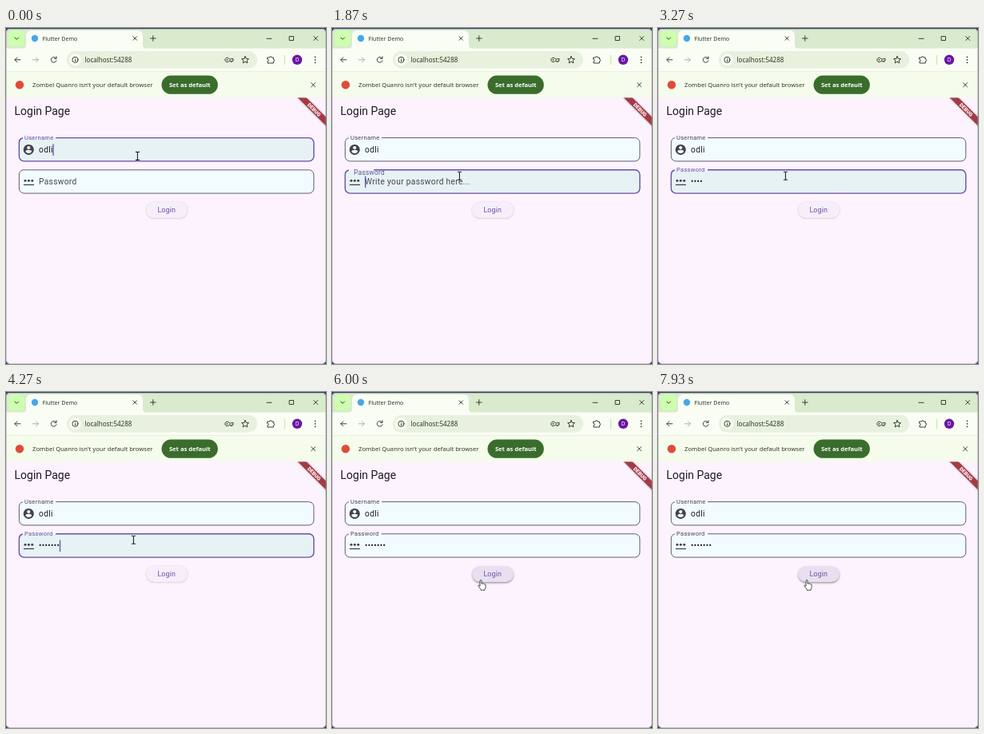
Write an HTML page that moves like this. It is 400 by 421 pixels and loops after 8 s.

```html
<!DOCTYPE html>
<html lang="en">
<head>
<meta charset="utf-8">
<title>Login Page</title>
<style>
  html, body { margin: 0; width: 100%; height: 100%; overflow: hidden; background: #34406b; }
  svg { display: block; width: 100vw; height: 100vh; }
  text { font-family: Roboto, sans-serif; fill: #1d1b20; white-space: pre; }
  .ui text { font-family: "Noto Sans", "Open Sans", sans-serif; fill: #30392a; }
  .line { fill: none; stroke: #2f382a; stroke-width: .95; stroke-linecap: round; stroke-linejoin: round; }
  .body { font-size: 10.2px; letter-spacing: .32px; }
  .muted { fill: #49454f; }
  .icon { fill: #45414b; }
  .cursor path { fill: #fff; stroke: #222; stroke-width: .8; stroke-linejoin: round; }
</style>
</head>
<body>
<svg viewBox="0 0 400 421" preserveAspectRatio="none">
  <defs>
    <filter id="soft" x="-20%" y="-40%" width="140%" height="200%"><feGaussianBlur stdDeviation="1"/></filter>
    <clipPath id="window"><rect y="1" width="400" height="420" rx="5"/></clipPath>
    <clipPath id="page"><rect y="87.500" width="400" height="334"/></clipPath>
  </defs>

  <g clip-path="url(#window)">
    <rect width="400" height="421" fill="#fdf3fe"/>
    <g class="ui">
      <rect width="400" height="27" fill="#d9eacd"/>
      <rect x="3" y="3" width="20" height="20" rx="6" fill="#cdffae"/>
      <path class="line" d="M11 12l2.300 2.300L15.600 12"/>
      <path d="M20 26q5 0 5-5V10q0-7 7-7h132q7 0 7 7v11q0 5 5 5z" fill="#f9fdf3"/>
      <circle cx="36" cy="13" r="4.200" fill="#47a6ea"/>
      <text x="45.500" y="15.800" font-size="7.100">Flutter Demo</text>
      <path class="line" d="M159 10.800l4.400 4.400m0-4.400l-4.400 4.400M180.500 13h6.600m-3.300-3.300v6.600M326 13.300h6M354.500 10.500h5v5h-5zM384.700 10.500l5 5m0-5l-5 5"/>

      <rect y="25.500" width="400" height="29" fill="#f9fdf3"/>
      <path class="line" d="M18 39.800h-7m3-3l-3 3 3 3"/>
      <path class="line" d="M33.500 39.800h7m-3-3l3 3-3 3" style="stroke:#a7afa1"/>
      <path class="line" d="M62.600 38a3.400 3.400 0 1 0 .4 2.800M63 35.800v2.500h-2.500"/>
      <rect x="76" y="29" width="238" height="21.500" rx="10.750" fill="#e7f1de"/>
      <circle cx="86.500" cy="39.800" r="7.500" fill="#f9fdf3"/>
      <circle class="line" cx="86.500" cy="39.800" r="3.600"/>
      <path class="line" d="M86.500 39.700v2M86.500 37.900v.1"/>
      <text x="98.500" y="42.700" font-size="8">localhost:54288</text>
      <path class="line" d="M279.200 38.800a2.800 2.800 0 1 0 0 2.200h1.600v1.300h1.900v-1.300h1.300v-2.200z"/>
      <circle cx="276.500" cy="39.900" r=".9" fill="#2f382a"/>
      <path class="line" d="M299 35.500l1.300 2.900 3.100.3-2.300 2.100.7 3.100-2.800-1.600-2.800 1.600.7-3.100-2.300-2.100 3.100-.3z"/>
      <path class="line" d="M327 37h2.500a1.300 1.300 0 0 1 2.600 0h2.200v2.200a1.300 1.300 0 0 1 0 2.600V44H327v-2.200a1.300 1.300 0 0 0 0-2.600z"/>
      <path d="M348.500 34v12" stroke="#c3edaa" stroke-width="1.200"/>
      <circle cx="364" cy="39.800" r="6.200" fill="#6b18a5"/>
      <text x="364" y="42.100" font-size="6.300" text-anchor="middle" style="fill:#fff">D</text>
      <g fill="#2f382a"><circle cx="386.500" cy="36.300" r=".9"/><circle cx="386.500" cy="39.800" r=".9"/><circle cx="386.500" cy="43.300" r=".9"/></g>

      <rect y="54.500" width="400" height="33" fill="#f5fcec"/>
      <path d="M0 54.500h400" stroke="#e5eedc" stroke-width=".7"/>
      <circle cx="17" cy="71.300" r="5.200" fill="#e14a3b"/>
      <text x="33" y="74.200" font-size="7.660">Zombel Quanro isn't your default browser</text>
      <rect x="194.500" y="59.500" width="70.300" height="23.300" rx="11.650" fill="#3a6d2c"/>
      <text x="229.800" y="74" font-size="7.600" font-weight="600" text-anchor="middle" style="fill:#fff">Set as default</text>
      <path class="line" d="M381.600 68.800l5 5m0-5l-5 5"/>
    </g>

    <text x="10.500" y="109.300" font-size="14">Login Page</text>
    <g clip-path="url(#page)">
      <g transform="translate(400 87.500) rotate(45)">
        <rect x="-30" y="17.200" width="60" height="7.600" fill="#000" opacity=".4" filter="url(#soft)"/>
        <rect x="-30" y="17.200" width="60" height="7.600" fill="#a53a46"/>
        <text y="23.300" font-size="6.500" font-weight="900" text-anchor="middle" style="fill:#fff">DEBUG</text>
      </g>
    </g>

    <g id="fields"></g>
    <g class="icon">
      <path fill-rule="evenodd" d="M28.300 145.900a6.500 6.500 0 1 0 .01 0zM28.300 147.900a2.100 2.100 0 1 1-.01 0zM24.400 155q0-2.300 3.900-2.300t3.900 2.300a4.700 4.700 0 0 1-7.800 0z"/>
      <circle cx="24" cy="191.300" r="1.500"/><circle cx="28.400" cy="191.300" r="1.500"/><circle cx="32.800" cy="191.300" r="1.500"/>
      <rect x="22" y="195.800" width="13" height="1.300"/>
    </g>

    <rect id="shadow" x="175" y="219" width="52" height="20" rx="10" fill="#000" filter="url(#soft)"/>
    <rect id="button" x="175" y="218" width="52" height="20" rx="10"/>
    <text x="200.700" y="231.300" font-size="8.900" letter-spacing=".12" text-anchor="middle" style="fill:#6750a4">Login</text>
    <rect x=".4" y="1.400" width="399.200" height="419.200" rx="5" fill="none" stroke="#81858c" stroke-width=".7" opacity=".7"/>
  </g>

  <g id="mouse" class="cursor">
    <path id="beam" d="M-2.500-5h1.500q1 0 1 1 0-1 1-1h1.500M0-4V4M-2.500 5h1.500q1 0 1-1 0 1 1 1h1.500" style="fill:none;stroke-width:1.100"/>
    <path id="arrow" d="M0 0v9.300l2.100-2 1.600 3.700 1.700-.7-1.600-3.600h3z"/>
    <path id="hand" d="M-1 .7q1-1.400 2 0v4q1-.8 1.700.2 1-.7 1.700.4 1.300-.6 1.600.8v3.200q0 1.400-1 2.500v1H.2v-1L-2.900 8q-.6-1.300.5-1.400L-1 7.700z"/>
  </g>
</svg>
<script>
const LOOP = 8000, FRAME = 1000 / 15;
const PRIMARY = '#6750a4', DARK = '#49454f';
const FOCUS_PASSWORD = 1785, CLICK_LOGIN = 5470;
const KEYS = [2270, 2400, 2530, 2670, 3570, 3730, 3900];
const MOUSE = [
  [0, 164.400, 160.400], [400, 164.400, 160.400], [850, 158.400, 213], [1200, 158.400, 213],
  [1600, 159.400, 185.300], [4480, 159.400, 185.300], [5000, 186, 235.500], [LOOP, 186, 235.500]
];
const $ = id => document.getElementById(id);
const clamp = v => Math.max(0, Math.min(1, v));
const smooth = v => v * v * (3 - 2 * v);
const set = (node, attrs) => { for (const k in attrs) node.setAttribute(k, attrs[k]); };

function add(parent, tag, attrs, text = '') {
  const node = document.createElementNS('http://www.w3.org/2000/svg', tag);
  set(node, attrs);
  node.textContent = text;
  return parent.appendChild(node);
}

// cubic-bezier(.4, 0, .2, 1)
function fastOutSlowIn(x) {
  if (x <= 0 || x >= 1) return clamp(x);
  let lo = 0, hi = 1, s = .5;
  for (let i = 0; i < 20; i++) {
    s = (lo + hi) / 2;
    const bx = 1.2 * s * (1 - s) ** 2 + .6 * s * s * (1 - s) + s ** 3;
    if (bx < x) lo = s; else hi = s;
  }
  return smooth(s);
}

function makeField(y, label, hint) {
  const left = 16.4, right = 384.8, bottom = y + 29.3, r = 6.2, baseline = y + 18.6;
  const parent = $('fields');
  const fill = add(parent, 'rect', { x: left, y, width: right - left, height: bottom - y, rx: r });
  const border = add(parent, 'path', { fill: 'none' });
  const title = add(parent, 'text', { class: 'body' }, label);
  const ghost = add(parent, 'text', { class: 'body muted', x: 41, y: baseline }, hint);
  const value = add(parent, 'text', { class: 'body', x: 41, y: baseline });
  const caret = add(parent, 'rect', { y: y + 7.8, width: 1.3, height: 14.5, fill: PRIMARY });
  const arc = (x, y) => `a${r} ${r} 0 0 1 ${x} ${y}`;
  return {
    contains: (mx, my) => mx > left && mx < right && my > y && my < bottom,
    draw({ hover, focus, float, hintShown, text, caretOn }) {
      set(fill, { fill: hover ? '#e6f2f4' : '#f2fcff' });
      set(border, {
        d: `M${21 + 41 * float} ${y}H${right - r}${arc(r, r)}V${bottom - r}${arc(-r, r)}H${left + r}${arc(-r, -r)}V${y + r}A${r} ${r} 0 0 1 21 ${y + .15}`,
        stroke: focus ? PRIMARY : DARK, 'stroke-width': focus ? 1.4 : .85
      });
      title.style.fill = focus ? PRIMARY : DARK;
      set(title, { transform: `translate(${41 - 18 * float} ${baseline - 16.2 * float}) scale(${1 - .25 * float})` });
      set(ghost, { opacity: text ? 0 : hintShown });
      if (value.textContent !== text) value.textContent = text;
      set(caret, { x: 41 + (text ? value.getComputedTextLength() - .4 : 0), opacity: focus && caretOn ? 1 : 0 });
    }
  };
}

const username = makeField(137.6, 'Username', '');
const password = makeField(177.8, 'Password', 'Write your password here...');

function mouseAt(t) {
  const i = MOUSE.findIndex(stop => stop[0] > t);
  const [t0, x0, y0] = MOUSE[i - 1], [t1, x1, y1] = MOUSE[i];
  const k = smooth((t - t0) / (t1 - t0));
  return [x0 + (x1 - x0) * k, y0 + (y1 - y0) * k];
}

function draw(t) {
  const [x, y] = mouseAt(t);
  const overUser = username.contains(x, y), overPass = password.contains(x, y);
  const overButton = x > 175 && x < 227 && y > 218 && y < 238;
  const typed = KEYS.filter(k => k <= t);
  const blinkStart = typed.length ? typed[typed.length - 1] : t >= FOCUS_PASSWORD ? FOCUS_PASSWORD : 0;
  const caretOn = (t - blinkStart) % 1000 < 500;
  const sinceFocus = t - FOCUS_PASSWORD;

  username.draw({ hover: overUser, focus: sinceFocus < 0, float: 1, hintShown: 0, text: 'odli', caretOn });
  password.draw({
    hover: overPass, focus: sinceFocus >= 0 && t < CLICK_LOGIN,
    float: fastOutSlowIn(sinceFocus / 167), hintShown: clamp(sinceFocus / 20),
    text: '•'.repeat(typed.length), caretOn
  });

  const lift = overButton ? clamp((t - 4850) / 200) : 0;
  set($('button'), { fill: `rgb(${246 - 13 * lift},${239 - 16 * lift},${250 - 9 * lift})` });
  set($('shadow'), { opacity: .2 + .17 * lift, y: 218.6 + .8 * lift });

  set($('mouse'), { transform: `translate(${x} ${y})` });
  const shape = overUser || overPass ? 'beam' : overButton ? 'hand' : 'arrow';
  for (const id of ['beam', 'arrow', 'hand']) $(id).style.display = id === shape ? '' : 'none';
}

const start = performance.now();
function tick() {
  const t = (performance.now() - start) % LOOP;
  draw(Math.min(119, Math.floor((t + 4) / FRAME)) * FRAME);
  requestAnimationFrame(tick);
}
tick();
</script>
</body>
</html>
```
